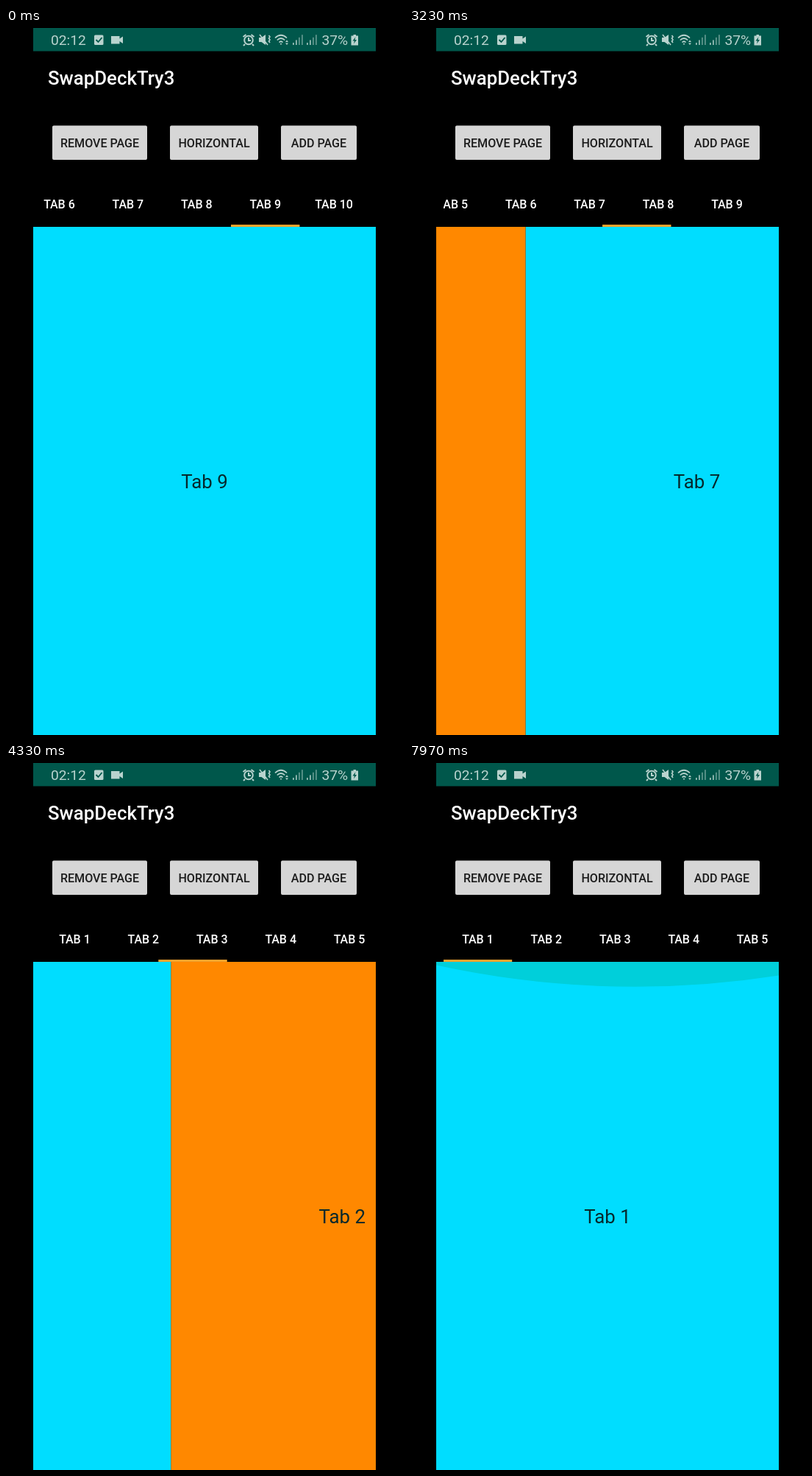
An HTML page that plays this animation: 540x960 px, repeating every 8000 ms.

```html
<!DOCTYPE html>
<html lang="en">
<head>
<meta charset="utf-8">
<title>Pager</title>
<style>
  html, body { margin: 0; width: 100%; height: 100%; overflow: hidden; background: #000; }
  svg { display: block; width: 100%; height: 100%; font-family: Roboto, sans-serif; }
  .status { fill: #b9d3ce; font-size: 19.2px; }
  .title { fill: #fff; font-size: 25.8px; font-weight: 500; }
  .btn rect { fill: #d6d6d6; }
  .btn text { fill: #1c1c1c; font-size: 16.1px; font-weight: 500; text-anchor: middle; }
  .tabs text { fill: #fff; font-size: 16px; font-weight: 500; text-anchor: middle; }
  .pages text { fill: #06282c; font-size: 25.8px; text-anchor: middle; }
</style>
</head>
<body>
<svg viewBox="0 0 540 960">
  <defs>
    <clipPath id="tabClip"><rect x="47" y="200" width="446" height="70"/></clipPath>
    <clipPath id="pageClip"><rect x="37" y="270" width="466" height="690"/></clipPath>
    <clipPath id="btnClip"><rect x="223" y="132.500" width="120" height="46.500" rx="2"/></clipPath>
  </defs>
  <rect width="540" height="960"/>
  <rect x="37" width="466" height="31.500" fill="#00574b"/>

  <g class="status">
    <text x="61" y="23">02:12</text>
    <text x="429.500" y="23">37%</text>
    <rect x="120" y="9.500" width="12.500" height="13.500" rx="1.500"/>
    <path d="M122.500 16l3 3 5-6" fill="none" stroke="#00574b" stroke-width="1.800"/>
    <path d="M143 11h11.500v3.500l4.500-3v9.500l-4.500-3v3.500h-11.500z"/>
    <g fill="none" stroke="#b9d3ce" stroke-width="2">
      <circle cx="330" cy="16.500" r="5.800"/>
      <path d="M330 13v4h3M322.500 12l4-3M337.500 12l-4-3M325 22l-2 2M335 22l2 2"/>
      <path d="M345 9l11 14M357.500 10l1.500 2-1.500 2 1.500 2-1.500 2 1.500 2" stroke-width="1.600"/>
      <path d="M366 13.500q8-7.500 16 0M368.800 16.500q5.200-5 10.400 0M371.500 19.500q2.500-2.500 5 0" stroke-width="1.700"/>
    </g>
    <path d="M344 13h3.500l5.500-4v14l-5.500-4h-3.500zM372.500 21h3l-1.500 2zM380 19l2-2.500 2 2.500zM380 20.500h4l-2 2.500z"/>
    <g id="signal"></g>
    <path d="M472.500 9h3.500v1.500h3v13h-9.500v-13h3z"/>
    <path d="M475.500 12l-4 5.500h2.500l-1 4 4-5.500h-2.500z" fill="#00574b"/>
  </g>

  <text class="title" x="57" y="77">SwapDeckTry3</text>
  <g class="btn" id="buttons"></g>
  <circle id="ripple" cx="282" cy="158" fill="#202020" clip-path="url(#btnClip)"/>

  <g clip-path="url(#tabClip)">
    <g class="tabs" id="tabs">
      <rect id="bar" y="267" width="93.400" height="3" fill="#f5a32c"/>
    </g>
  </g>
  <g clip-path="url(#pageClip)">
    <g class="pages" id="pages"></g>
    <path id="glow" fill="#00cfda"/>
  </g>
</svg>
<script>
const LOOP = 8000, COUNT = 10, LEFT = 37, WIDTH = 466, TAB = 93.4, FIRST = 93.5;
// Each swipe goes one page back: start of the page slide, start of the indicator slide.
const SWIPES = [
  [2532, 2548], [3132, 3147], [3650, 3655], [3660, 3655],
  [3869, 3851], [4060, 4060], [4260, 4250], [4452, 4419]
];

const $ = id => document.getElementById(id);
const clamp = (v, lo = 0, hi = 1) => Math.min(hi, Math.max(lo, v));
const span = (t, start, length) => clamp((t - start) / length);
const quintOut = x => 1 - (1 - x) ** 5;

// cubic-bezier(.4, 0, .2, 1)
function standardEase(x) {
  let lo = 0, hi = 1, s = x;
  for (let i = 0; i < 20; i++) {
    s = (lo + hi) / 2;
    const at = 1.2 * s * (1 - s) ** 2 + 0.6 * s * s * (1 - s) + s ** 3;
    if (at < x) lo = s; else hi = s;
  }
  return 3 * s * s * (1 - s) + s ** 3;
}

function add(parent, tag, attrs, text = "") {
  const el = document.createElementNS("http://www.w3.org/2000/svg", tag);
  for (const key in attrs) el.setAttribute(key, attrs[key]);
  el.textContent = text;
  parent.append(el);
  return el;
}

for (const x of [390, 409])
  for (let i = 0; i < 4; i++)
    add($("signal"), "rect", {
      x: x + i * 4, y: 20 - i * 3.6, width: 1.8, height: 3 + i * 3.6, opacity: i < 2 ? 0.8 : 0.5
    });

for (const [x, width, label] of [[63, 129, "REMOVE PAGE"], [223, 120, "HORIZONTAL"], [374, 103, "ADD PAGE"]]) {
  add($("buttons"), "rect", { x, y: 132.5, width, height: 46.5, rx: 2 });
  add($("buttons"), "text", { x: x + width / 2, y: 162 }, label);
}

const tabCenter = n => FIRST + (n - 1) * TAB;
const pages = [];
for (let n = 1; n <= COUNT; n++) {
  add($("tabs"), "text", { x: tabCenter(n), y: 245 }, "TAB " + n);
  const page = add($("pages"), "g", {});
  add(page, "rect", { x: LEFT, y: 270, width: WIDTH, height: 690, fill: n % 2 ? "#00ddff" : "#ff8800" });
  add(page, "text", { x: 270, y: 625 }, "Tab " + n);
  pages.push(page);
}

function render(t) {
  let pos = 9, mark = 9;
  for (const [slide, select] of SWIPES) {
    pos -= quintOut(span(t, slide, 420));
    mark -= standardEase(span(t, select, 300));
  }

  // Pages run right to left, tabs left to right.
  pages.forEach((page, i) => {
    const offset = pos - (i + 1);
    page.setAttribute("transform", `translate(${offset * WIDTH} 0)`);
    page.setAttribute("visibility", Math.abs(offset) < 1 ? "visible" : "hidden");
  });
  const scroll = clamp(tabCenter(pos) - 270, 0, COUNT * TAB - 446);
  $("tabs").setAttribute("transform", `translate(${-scroll} 0)`);
  $("bar").setAttribute("x", tabCenter(mark) - TAB / 2);

  const press = span(t, 6525, 430);
  $("ripple").setAttribute("r", 10 + 70 * quintOut(press));
  $("ripple").setAttribute("opacity", press < 1 ? 0.16 * Math.sin(Math.PI * press) : 0);

  const pull = span(t, 7690, 280);
  $("glow").setAttribute("d",
    `M37 270V${270 + 4.5 * pull}Q270 ${270 + 55 * pull} 503 ${270 + 18.5 * pull}V270Z`);
  $("glow").setAttribute("opacity", Math.min(1, pull * 1.3));
}

const begin = performance.now();
function tick() {
  render((performance.now() - begin) % LOOP);
  requestAnimationFrame(tick);
}
tick();
</script>
</body>
</html>
```
